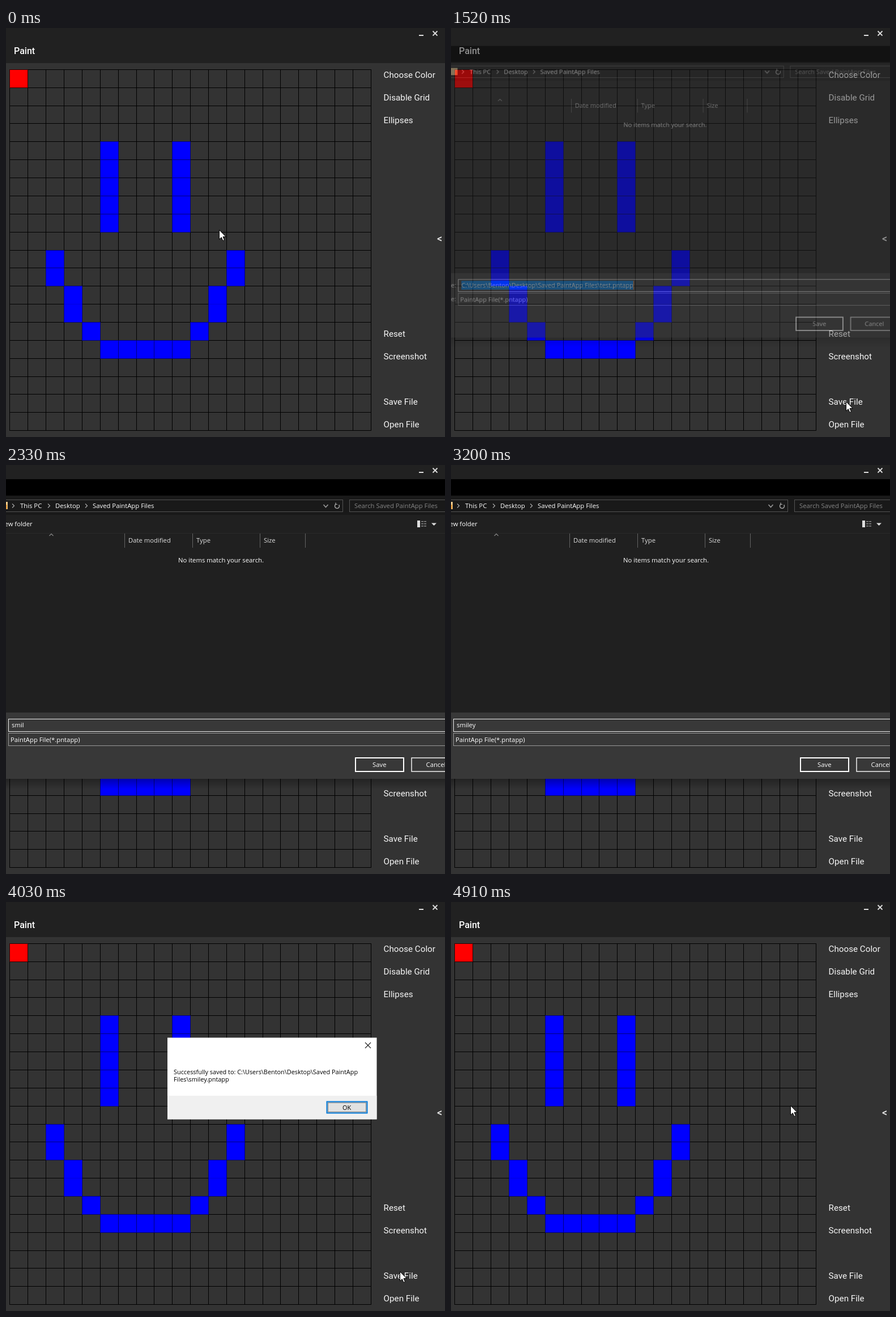
These frames come from a looping animation (775x722 px, 5510 ms). An HTML page with a canvas:

```html
<!DOCTYPE html>
<html lang="en">
<head>
<meta charset="utf-8">
<title>Paint</title>
<style>
  html, body { margin: 0; width: 100%; height: 100%; overflow: hidden; background: #333; }
  canvas { display: block; }
</style>
</head>
<body>
<canvas id="stage" width="775" height="722"></canvas>
<script>
const LOOP = 5510, PAD = 60;
const UI = '"Open Sans", sans-serif';
const FOLDER = 'C:\\Users\\Benton\\Desktop\\Saved PaintApp';
const screen2d = document.getElementById('stage').getContext('2d');
const layer = document.createElement('canvas');
layer.width = 900;
layer.height = 722;
const layer2d = layer.getContext('2d');
let g = screen2d;

// drawing helpers
function rect(x, y, w, h, color) {
  g.fillStyle = color;
  g.fillRect(x, y, w, h);
}
function frame(x, y, w, h, color, width = 1) {
  g.strokeStyle = color;
  g.lineWidth = width;
  g.strokeRect(x, y, w, h);
}
function line(points, color, width = 1) {
  g.strokeStyle = color;
  g.lineWidth = width;
  g.beginPath();
  points.forEach(([x, y]) => g.lineTo(x, y));
  g.stroke();
}
function text(s, x, y, color = '#fff', font = '11.3px ' + UI) {
  g.font = font;
  g.fillStyle = color;
  g.fillText(s, x, y);
}
function cross(x, y, r, color, width) {
  line([[x - r, y - r], [x + r, y + r]], color, width);
  line([[x - r, y + r], [x + r, y - r]], color, width);
}

// timing helpers
const clamp = v => Math.min(1, Math.max(0, v));
const snap = (t, start, gap) => start + Math.floor((t - start) / gap) * gap;
const smooth = p => p * p * (3 - 2 * p);
const fadeIn = (t, start) => t < start ? 0 : 1 - Math.exp((start - t) / 55);

// paint window
const colX = i => Math.round(6.42 + 31.87 * i);
const rowY = i => Math.round(72.8 + 31.87 * i);
function cells(col, row, cols, rows, color, edge) {
  for (let c = col; c < col + cols; c++)
    for (let r = row; r < row + rows; r++) {
      const x = colX(c), y = rowY(r), w = colX(c + 1) - x, h = rowY(r + 1) - y;
      rect(x, y, w + 1, h + 1, edge);
      rect(x + 1, y + 1, w - 1, h - 1, color);
    }
}
function paintWindow() {
  rect(0, 0, 775, 722, '#333');
  rect(0, 0, 775, 62, '#212121');
  rect(729, 12, 8, 2, '#ddd');
  cross(757.5, 9.5, 4, '#ddd', 1.8);
  text('Paint', 14, 46, '#fff', '500 16px Roboto, sans-serif');

  for (let i = 0; i <= 20; i++) {
    rect(colX(i), 73, 1, 638, '#000');
    rect(6, rowY(i), 639, 1, '#000');
  }
  cells(0, 0, 1, 1, '#f00', '#300');
  for (const [c, r, w, h] of [[5, 4, 1, 5], [9, 4, 1, 5], [2, 10, 1, 2], [12, 10, 1, 2],
    [3, 12, 1, 2], [11, 12, 1, 2], [4, 14, 1, 1], [10, 14, 1, 1], [5, 15, 5, 1]])
    cells(c, r, w, h, '#00f', '#000080');
  for (const c of [3, 11]) rect(colX(c) + 1, rowY(13), 31, 1, '#0000e0');

  const menu = [['Choose Color', 88], ['Disable Grid', 127.5], ['Ellipses', 167.5],
    ['Reset', 545], ['Screenshot', 585], ['Save File', 664.5], ['Open File', 704.5]];
  for (const [label, y] of menu) text(label, 666.6, y, '#f6f6f6', '15.2px Roboto, sans-serif');
  text('<', 761, 378, '#e8e8e8', '500 18px Roboto, sans-serif');
}

function saveDialog(t) {
  rect(-PAD, 25, 900, 529, '#202020');
  rect(-PAD, 25, 900, 29, '#000');
  rect(-PAD, 54, 900, 34, '#191919');
  const shadow = g.createLinearGradient(0, 554, 0, 572);
  shadow.addColorStop(0, 'rgba(0,0,0,.3)');
  shadow.addColorStop(1, 'rgba(0,0,0,0)');
  rect(-PAD, 554, 900, 18, shadow);

  // address bar
  frame(-50.5, 61.5, 645, 21, '#535353');
  rect(-9, 65, 12, 13, '#ecc98c');
  rect(0, 70, 2, 8, '#e39a3b');
  for (const x of [13, 76, 142])
    line([[x - 2, 68.5], [x + 1.5, 72], [x - 2, 75.5]], '#aaa', 1.2);
  text('This PC', 25, 75.5);
  text('Desktop', 87, 75.5);
  text('Saved PaintApp Files', 153, 75.5);
  line([[560.5, 70], [564.5, 74.5], [568.5, 70]], '#999', 1.6);
  g.beginPath();
  g.arc(584.5, 72.5, 4, -0.6, 4.2);
  g.strokeStyle = '#aaa';
  g.lineWidth = 1.4;
  g.stroke();
  line([[582, 66.5], [582, 69.5], [585, 69.5]], '#aaa', 1.2);
  frame(606.5, 61.5, 220, 21, '#535353');
  text('Search Saved PaintApp Files', 615, 75.5, '#858585');

  // toolbar appears a moment after the window
  if (t >= 1600) {
    text('New folder', -11, 108);
    rect(726, 98, 5, 12, '#ddd');
    for (const y of [99, 103, 107]) {
      rect(733, y, 4, 1.5, '#888');
      rect(738, y, 4, 1.5, '#888');
    }
    g.fillStyle = '#ddd';
    g.beginPath();
    g.moveTo(751, 102.5);
    g.lineTo(760, 102.5);
    g.lineTo(755.5, 107);
    g.fill();
    rect(-PAD, 120, 900, 1, '#2a2a2a');
  }

  // file list
  line([[76.5, 125], [80, 121.5], [83.5, 125]], '#888', 1.2);
  for (const x of [209, 329, 448, 528]) rect(x, 121, 1, 25, '#636363');
  text('Date modified', 216, 137, '#dedede');
  text('Type', 336, 137, '#dedede');
  text('Size', 455, 137, '#dedede');
  text('No items match your search.', 304, 172);

  // file name and buttons
  rect(-PAD, 437, 900, 117, '#383838');
  text('e:', -9, 463);
  text('e:', -9, 488);
  frame(4.5, 448.5, 850, 22, '#f0f0f0');
  frame(4.5, 473.5, 850, 22, '#999');
  if (t < 1900) {
    const path = FOLDER + ' Files\\test.pntapp';
    g.font = '11.3px ' + UI;
    const w = g.measureText(path).width;
    rect(10, 451, w, 16, '#0078d7');
    rect(10 + w, 451, 1, 16, '#ff8728');
    text(path, 10, 463);
  } else {
    const typed = [1900, 1995, 2090, 2330, 2540, 2700].filter(k => t >= k).length;
    text('smiley'.slice(0, typed), 10, 463);
  }
  text('PaintApp File(*.pntapp)', 8, 488.5);
  frame(617, 517, 85, 24, '#fff', 2);
  text('Save', 647, 532.5);
  frame(716, 517, 85, 24, '#f0f0f0', 1.5);
  text('Cancel', 741.5, 532.5);
}

function savedMessage(t) {
  const font = '10.9px ' + UI;
  const hover = t >= 4590;
  rect(285, 239.5, 369.5, 144, '#fff');
  rect(285, 342, 369.5, 41.5, '#f0f0f0');
  if (t < 4720) cross(639, 253, 5, '#222', 1.1);
  text('Successfully saved to: ' + FOLDER, 296, 304, '#000', font);
  text('Files\\smiley.pntapp', 296, 317, '#000', font);
  rect(566, 352, 72, 20, hover ? '#e5f1fb' : '#e1e1e1');
  frame(566.5, 352.5, 71, 20, '#0078d7', hover ? 1.3 : 2);
  g.setLineDash([1, 1]);
  frame(568.5, 354.5, 67, 16, '#222');
  g.setLineDash([]);
  text('OK', 594, 366.5, '#000', font);
}

// popups grow slightly as they fade in and shrink as they fade out
function popup(draw, t, alpha, cx, cy) {
  if (alpha <= 0) return;
  layer2d.setTransform(1, 0, 0, 1, 0, 0);
  layer2d.clearRect(0, 0, 900, 722);
  layer2d.translate(PAD, 0);
  g = layer2d;
  draw(t);
  g = screen2d;
  const scale = 1 - 0.047 * (1 - alpha);
  g.save();
  g.globalAlpha = alpha;
  g.translate(cx, cy);
  g.scale(scale, scale);
  g.drawImage(layer, -PAD - cx, -cy);
  g.restore();
}
function dialogAlpha(t) {
  if (t < 1754) return fadeIn(snap(t, 1470, 47.3), 1486);
  return t < 3284 ? 1 : 1 - clamp((snap(t, 3284, 47) - 3230) / 148);
}
function messageAlpha(t) {
  if (t < 3610) return fadeIn(snap(t, 3284, 47), 3422);
  return t < 4765 ? 1 : 1 - clamp((snap(t, 4765, 47) - 4715) / 145);
}

// mouse pointer
const stops = [[170, 376, 356], [680, 704, 668], [735, 700, 668], [790, 694, 664], [850, 692, 661],
  [910, 697, 659], [4030, 697, 659], [4540, 601, 362], [4590, 599, 359]];
function pointerAt(t) {
  const next = stops.findIndex(s => t < s[0]);
  if (next === 0) return stops[0].slice(1);
  if (next < 0) return stops[stops.length - 1].slice(1);
  const [t0, x0, y0] = stops[next - 1], [t1, x1, y1] = stops[next];
  const long = t1 - t0 === 510;
  const p = long ? smooth(clamp((snap(t, t0, 46.4) + 46.4 - t0) / 510)) : 0;
  return [x0 + (x1 - x0) * p, y0 + (y1 - y0) * p];
}
function pointer(t) {
  if (t >= 1900 && t < 3284) return;
  const [x, y] = pointerAt(t).map(Math.round);
  g.beginPath();
  for (const [dx, dy] of [[0, 0], [0, 16.5], [3.8, 13], [6.4, 19], [9, 17.9], [6.5, 12], [11.6, 12]])
    g.lineTo(x + 0.5 + dx, y + 0.5 + dy);
  g.closePath();
  g.fillStyle = '#fff';
  g.fill();
  g.strokeStyle = '#000';
  g.lineWidth = 1;
  g.stroke();
}

function render() {
  const t = performance.now() % LOOP;
  paintWindow();
  popup(saveDialog, t, dialogAlpha(t), 321, 272);
  popup(savedMessage, t, messageAlpha(t), 469.5, 311);
  pointer(t);
  requestAnimationFrame(render);
}
render();
</script>
</body>
</html>
```
